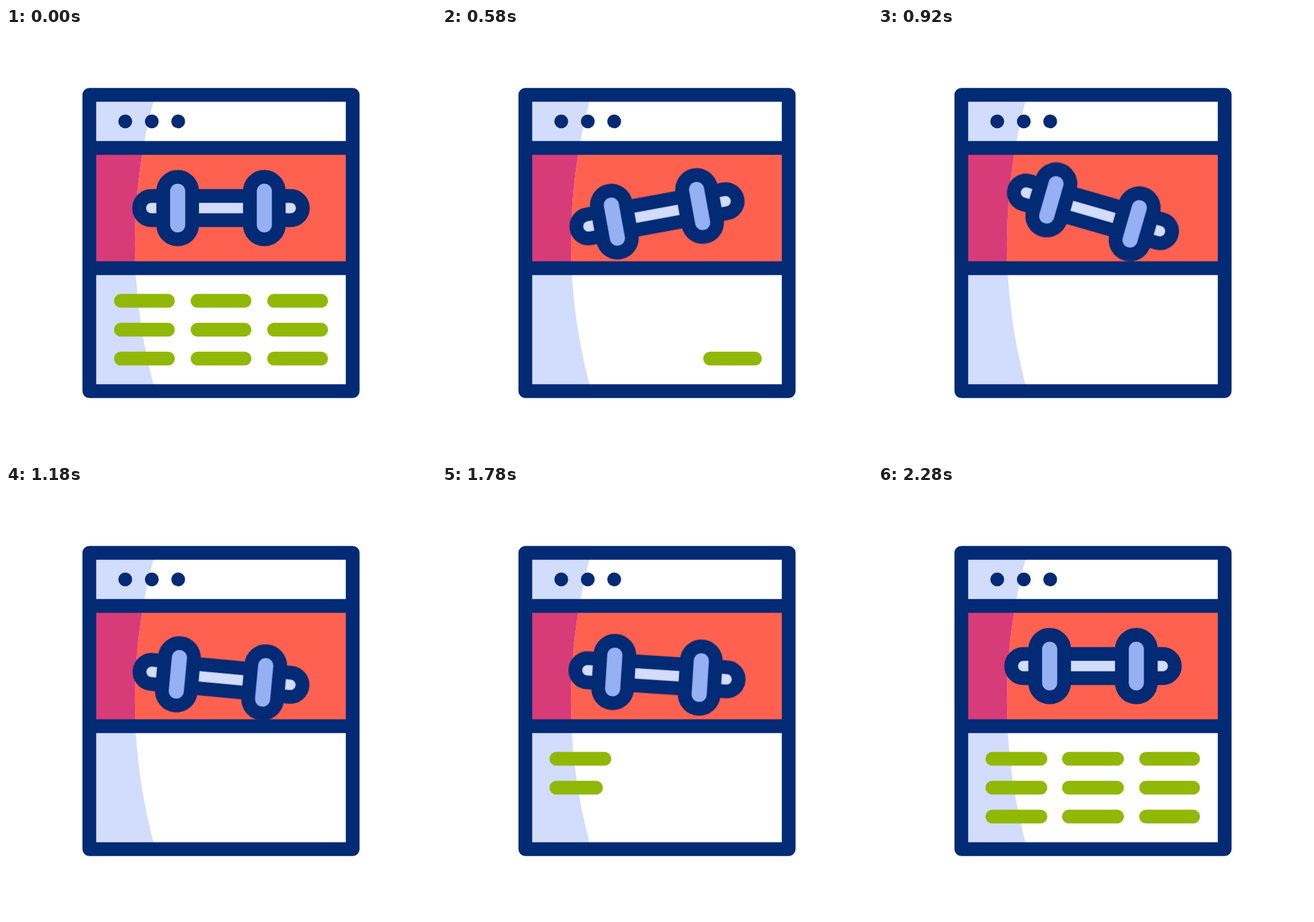
An HTML page that plays this animation: 640x640 px, repeating every 2400 ms.

```html
<!DOCTYPE html>
<html lang="en">
<head>
<meta charset="utf-8">
<title>Workout page</title>
<style>
  @property --p { syntax: "<number>"; inherits: true; initial-value: 0; }

  html, body { margin: 0; width: 100%; height: 100%; overflow: hidden; background: #fff; }
  svg { display: block; width: 100vw; height: 100vh; }

  .ink { fill: none; stroke: #032a74; stroke-width: 20.5; stroke-linecap: round; stroke-linejoin: round; }
  .rod { fill: #d2dcfd; }
  .plate { fill: #95b1f4; }

  #lift, #tilt { transform-origin: 320px 268px; animation: 2.4s cubic-bezier(.333, 0, .667, 1) infinite; }
  #lift { animation-name: lift; }
  #tilt { animation-name: tilt; }

  /* --p counts finished bars, 0 to 9 */
  #erase, #write { animation: 2.4s cubic-bezier(.45, 0, .25, 1) infinite; }
  #erase { animation-name: erase; }
  #write { animation-name: write; }
  #erase path { --f: clamp(0, var(--i) + 1 - var(--p), 1); }
  #write path { --f: clamp(0, var(--p) - var(--i), 1); }
  .bars path {
    fill: none; stroke: #91b806; stroke-width: 20.5; stroke-linecap: round;
    stroke-dasharray: calc(var(--f) * var(--w) * 1px) 200px;
    opacity: clamp(0, var(--f) * 9999, 1);
  }

  @keyframes lift {
    0%, 90%, 100% { transform: translateY(0); }
    17.708% { transform: translateY(55px); }
    30.625% { transform: translateY(-37px); }
    43.708% { transform: translateY(30px); }
    61.25% { transform: translateY(-20.2px); }
    75.208% { transform: translateY(13.5px); }
  }
  @keyframes tilt {
    0%, 90%, 100% { transform: rotate(0deg); }
    18.333% { transform: rotate(-16.8deg); }
    39.167% { transform: rotate(16.2deg); }
    59.167% { transform: rotate(-5.4deg); }
    75% { transform: rotate(3.8deg); }
  }
  @keyframes erase {
    0%, 5.8333% { --p: 0; }
    34.1667%, 100% { --p: 9; }
  }
  @keyframes write {
    0%, 66.6667% { --p: 0; }
    95%, 100% { --p: 9; }
  }
</style>
</head>
<body>
<svg viewBox="0 0 640 640">
  <clipPath id="shade"><path d="M124 99H222.4A816 816 0 0 0 222.4 541H124Z"/></clipPath>

  <path fill="#ff6150" d="M124 178.5H516V357.5H124Z"/>
  <g clip-path="url(#shade)">
    <path fill="#d2dcfd" d="M124 99H300V541H124Z"/>
    <path fill="#d73b78" d="M124 178.5H300V357.5H124Z"/>
  </g>

  <g class="ink">
    <path d="M124 99.5H516V540.5H124ZM124 178.5H516M124 357.5H516"/>
  </g>
  <g fill="#032a74">
    <circle cx="177.5" cy="139" r="10.3"/>
    <circle cx="217" cy="139" r="10.3"/>
    <circle cx="256.3" cy="139" r="10.3"/>
  </g>

  <g id="erase" class="bars"></g>
  <g id="write" class="bars"></g>

  <g id="lift"><g id="tilt" class="ink">
    <rect class="rod" x="198.2" y="250" width="243.6" height="36" rx="18"/>
    <rect class="plate" x="234" y="221.5" width="43" height="93" rx="21.5"/>
    <rect class="plate" x="363" y="221.5" width="43" height="93" rx="21.5"/>
  </g></g>
</svg>
<script>
  function addBars(id, grow) {
    const group = document.getElementById(id);
    for (let i = 0; i < 9; i++) {
      const col = Math.floor(i / 3);
      const extra = col < 2 ? grow : 0;
      const w = 70 + 2 * extra;
      const bar = document.createElementNS(group.namespaceURI, "path");
      bar.setAttribute("d", `M${171 + 114 * col - extra} ${406 + 43 * (i % 3)}h${w}`);
      bar.style.setProperty("--i", i);
      bar.style.setProperty("--w", w);
      group.append(bar);
    }
  }
  addBars("erase", 0);
  addBars("write", 0.8);
</script>
</body>
</html>
```
